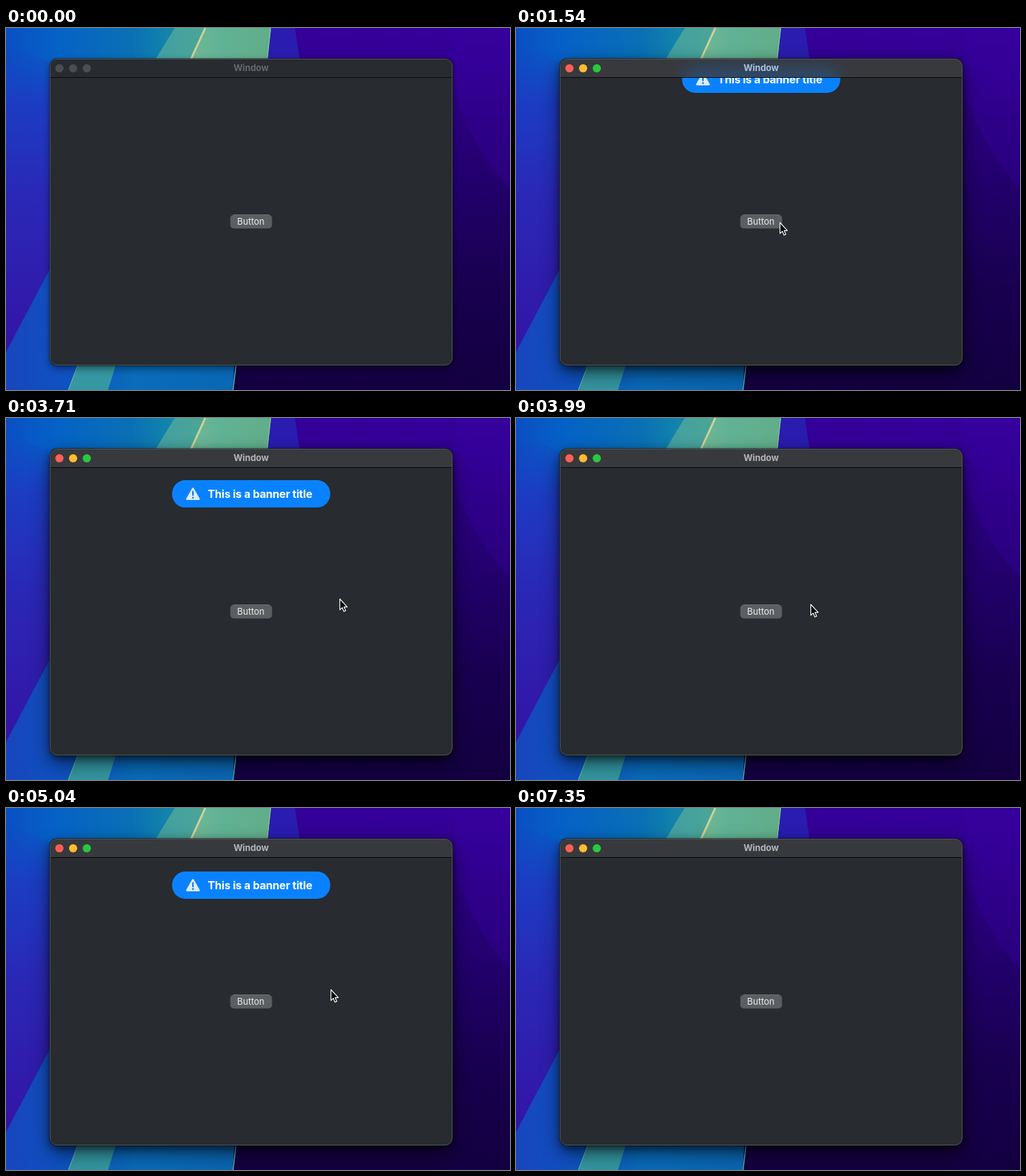
Recreate the animation shown at these times as an HTML page. Size 736 px wide and 530 px high, loop 7.63 s.

```html
<!DOCTYPE html>
<html lang="en">
<head>
<meta charset="utf-8">
<title>Banner demo</title>
<style>
  html, body { margin: 0; width: 100%; height: 100%; overflow: hidden; background: #14003c; }
  svg { display: block; width: 736px; height: 530px; }
  text { font-family: Inter, Roboto, sans-serif; }
  .title { font-size: 13px; font-weight: 700; text-anchor: middle; letter-spacing: -.1px; fill: #66696c; }
  .label { font-size: 13px; text-anchor: middle; fill: #ececed; }
  .banner-text { font-size: 16px; font-weight: 700; letter-spacing: -.2px; fill: #fff; }
  .bar { fill: #282b2f; }
  .light { fill: #4b4d51; }
  .far { opacity: 0; }
  .active .far { opacity: .55; }
  .active .bar { fill: #38393d; }
  .active .title { fill: #b4b5b7; }
  .active .tinted { fill: #aabfda; }
  .active .red { fill: #ff5f57; }
  .active .yellow { fill: #febc2e; }
  .active .green { fill: #28c840; }
</style>
</head>
<body>
<svg id="stage" viewBox="0 0 736 530" xmlns="http://www.w3.org/2000/svg">
  <defs>
    <linearGradient id="sky" x1="0" y1="0" x2="1" y2="0">
      <stop offset="0" stop-color="#0a4fc4"/>
      <stop offset=".3" stop-color="#0562c6"/>
      <stop offset=".75" stop-color="#0a70b4"/>
      <stop offset="1" stop-color="#1488aa"/>
    </linearGradient>
    <linearGradient id="left" x1="0" y1="0" x2="0" y2="1">
      <stop offset="0" stop-color="#1a40c2" stop-opacity="0"/>
      <stop offset=".2" stop-color="#1c3cc2"/>
      <stop offset=".5" stop-color="#2a28b6"/>
      <stop offset="1" stop-color="#3414a6"/>
    </linearGradient>
    <linearGradient id="low" x1="0" y1="0" x2="1" y2="0">
      <stop offset="0" stop-color="#1846bc"/>
      <stop offset=".3" stop-color="#0d54c2"/>
      <stop offset=".55" stop-color="#0a6cba"/>
      <stop offset="1" stop-color="#0a66b2"/>
    </linearGradient>
    <linearGradient id="teal" x1="0" y1="0" x2="1" y2="0">
      <stop offset="0" stop-color="#3f9fa4"/>
      <stop offset="1" stop-color="#4ca596"/>
    </linearGradient>
    <linearGradient id="mint" x1="0" y1="0" x2="1" y2="0">
      <stop offset="0" stop-color="#74b892"/>
      <stop offset=".4" stop-color="#60b296"/>
      <stop offset="1" stop-color="#62ad88"/>
    </linearGradient>
    <linearGradient id="night" x1="0" y1="0" x2="0" y2="1">
      <stop offset="0" stop-color="#35009a"/>
      <stop offset=".1" stop-color="#310092"/>
      <stop offset=".25" stop-color="#2a007e"/>
      <stop offset=".45" stop-color="#21006a"/>
      <stop offset=".7" stop-color="#190050"/>
      <stop offset="1" stop-color="#130040"/>
    </linearGradient>
    <filter id="soft" x="-20%" y="-20%" width="140%" height="140%"><feGaussianBlur stdDeviation="6"/></filter>
    <filter id="wide" x="-20%" y="-20%" width="140%" height="140%"><feGaussianBlur stdDeviation="15"/></filter>
    <filter id="haze" x="-30%" y="-150%" width="160%" height="400%"><feGaussianBlur stdDeviation="10"/></filter>
    <clipPath id="body"><rect x="65" y="73" width="586" height="420"/></clipPath>
    <clipPath id="top"><rect x="65" y="46" width="586" height="26"/></clipPath>
    <rect id="pill" x="242.5" width="231" height="40" rx="19.5"/>
  </defs>

  <!-- wallpaper -->
  <rect width="736" height="530" fill="url(#night)"/>
  <path d="M736 0V235Q690 190 655 95V0Z" fill="#3a00a4" opacity=".28"/>
  <path d="M386 0H422L431 60H380Z" fill="#2a1cae"/>
  <path d="M0 0H246L200 80V330H0Z" fill="url(#sky)"/>
  <path d="M0 20L65 50V350L0 475Z" fill="url(#left)"/>
  <path d="M0 475L66 349L130 400H340L331 530H0Z" fill="url(#low)"/>
  <path d="M0 475L66 349" stroke="#2444c8" stroke-opacity=".6"/>
  <path d="M246 0H291L262 60H210Z" fill="url(#teal)"/>
  <path d="M291 0H387L380 60H262Z" fill="url(#mint)"/>
  <path d="M291 0L269 48" stroke="#cdd29a" stroke-width="3"/>
  <path d="M386.500 0L381.500 46" stroke="#8fd0a0"/>
  <path d="M108 485H163L149 530H91Z" fill="#3597a2"/>
  <path d="M108 485L91 530" stroke="#75bfa8"/>
  <path d="M337 485L331.500 530" stroke="#58b4b4" stroke-width="1.500"/>

  <!-- window -->
  <g id="win">
    <rect class="far" x="65" y="57" width="586" height="448" rx="12" filter="url(#wide)"/>
    <rect x="65" y="50" width="586" height="448" rx="10" opacity=".5" filter="url(#soft)"/>
    <rect x="63.500" y="44.500" width="589" height="450" rx="11" fill="#0b0c10"/>
    <rect x="64.500" y="45.500" width="587" height="448" rx="10" fill="#282b2f"/>
    <path class="bar" d="M65 72V55.500A9.500 9.500 0 0 1 74.500 46H641.500A9.500 9.500 0 0 1 651 55.500V72Z"/>
    <g clip-path="url(#top)"><use id="glow" href="#pill" fill="#0a82ff" filter="url(#haze)"/></g>
    <rect x="65" y="72" width="586" height="1" fill="#08090b"/>
    <circle class="light red" cx="78" cy="59" r="6"/>
    <circle class="light yellow" cx="98" cy="59" r="6"/>
    <circle class="light green" cx="118" cy="59" r="6"/>
    <text id="title" class="title" x="358" y="63">Window</text>

    <rect x="327.500" y="273.500" width="61" height="20" rx="5" fill="#5c5f62"/>
    <path d="M332 273.500H384" stroke="#707376"/>
    <text class="label" x="357.500" y="287.700">Button</text>

    <g clip-path="url(#body)">
      <g id="banner">
        <use href="#pill" fill="#0a82ff"/>
        <path d="M273 12.500L281.500 27.500H264.500Z" fill="#dcecff" stroke="#dcecff" stroke-width="3" stroke-linejoin="round"/>
        <path d="M273 16.500V22" stroke="#0a72e0" stroke-width="2" stroke-linecap="round"/>
        <circle cx="273" cy="25.700" r="1.300" fill="#0a72e0"/>
        <text class="banner-text" x="294.500" y="25.800">This is a banner title</text>
      </g>
    </g>
    <rect x="64.500" y="45.500" width="587" height="448" rx="10" fill="none" stroke="#c8d2be" stroke-opacity=".32"/>
  </g>

  <path id="cursor" d="M.500 0V15.800L4 12.600L6.400 18.300L9 17.200L6.600 11.600H11.300Z" fill="#000" stroke="#fff" stroke-width="1.200" stroke-linejoin="round"/>
</svg>
<script>
  const LOOP = 7630, TICK = 70, ACTIVE_AT = 1540;
  const HIDDEN = 3, SHOWN = 93;

  // when the spring starts, from when it may be seen, and where it goes
  const slides = [
    { start: 1443, from: ACTIVE_AT, to: SHOWN },
    { start: 3699, from: 3710, to: HIDDEN },
    { start: 4533, from: 4550, to: SHOWN },
    { start: 6776, from: 6790, to: HIDDEN }
  ];

  // pointer moves: start, end, x, y
  const home = [370, 545];
  const moves = [
    [140, 490, 478, 330],
    [840, 1120, 385, 285],
    [1540, 1960, 487, 265],
    [3710, 4270, 373, 281],
    [4620, 5040, 474, 266],
    [6790, 7350, 497, 545]
  ];

  const $ = id => document.getElementById(id);
  const win = $('win'), title = $('title'), glow = $('glow'), banner = $('banner'), cursor = $('cursor');
  const clamp = v => Math.min(1, Math.max(0, v));
  const smooth = u => u * u * (3 - 2 * u);
  const spring = ms => { const x = ms * .02; return 1 - Math.exp(-x) * (1 + x); };
  const place = (el, x, y) => el.setAttribute('transform', `translate(${x.toFixed(2)} ${y.toFixed(2)})`);

  function bannerTop(t) {
    const s = slides.filter(s => t >= s.from).pop();
    if (!s) return HIDDEN;
    const origin = HIDDEN + SHOWN - s.to;
    return origin + (s.to - origin) * spring(t - s.start);
  }

  function pointer(t) {
    let [x, y] = home;
    for (const [start, end, tx, ty] of moves) {
      const u = smooth(clamp((t - start) / (end - start)));
      x += (tx - x) * u;
      y += (ty - y) * u;
    }
    return [x, y];
  }

  function draw(now) {
    const t = Math.floor((now % LOOP) / TICK) * TICK;
    const top = bannerTop(t);
    const under = clamp((top - 5) / 30) * clamp((SHOWN - top) / 20);
    win.classList.toggle('active', t >= ACTIVE_AT);
    title.classList.toggle('tinted', under > .5);
    place(banner, 0, top);
    place(glow, 0, top);
    glow.setAttribute('opacity', (under * .22).toFixed(3));
    place(cursor, ...pointer(t));
  }

  const begin = performance.now();
  function frame() {
    draw(performance.now() - begin);
    requestAnimationFrame(frame);
  }
  frame();
</script>
</body>
</html>
```
